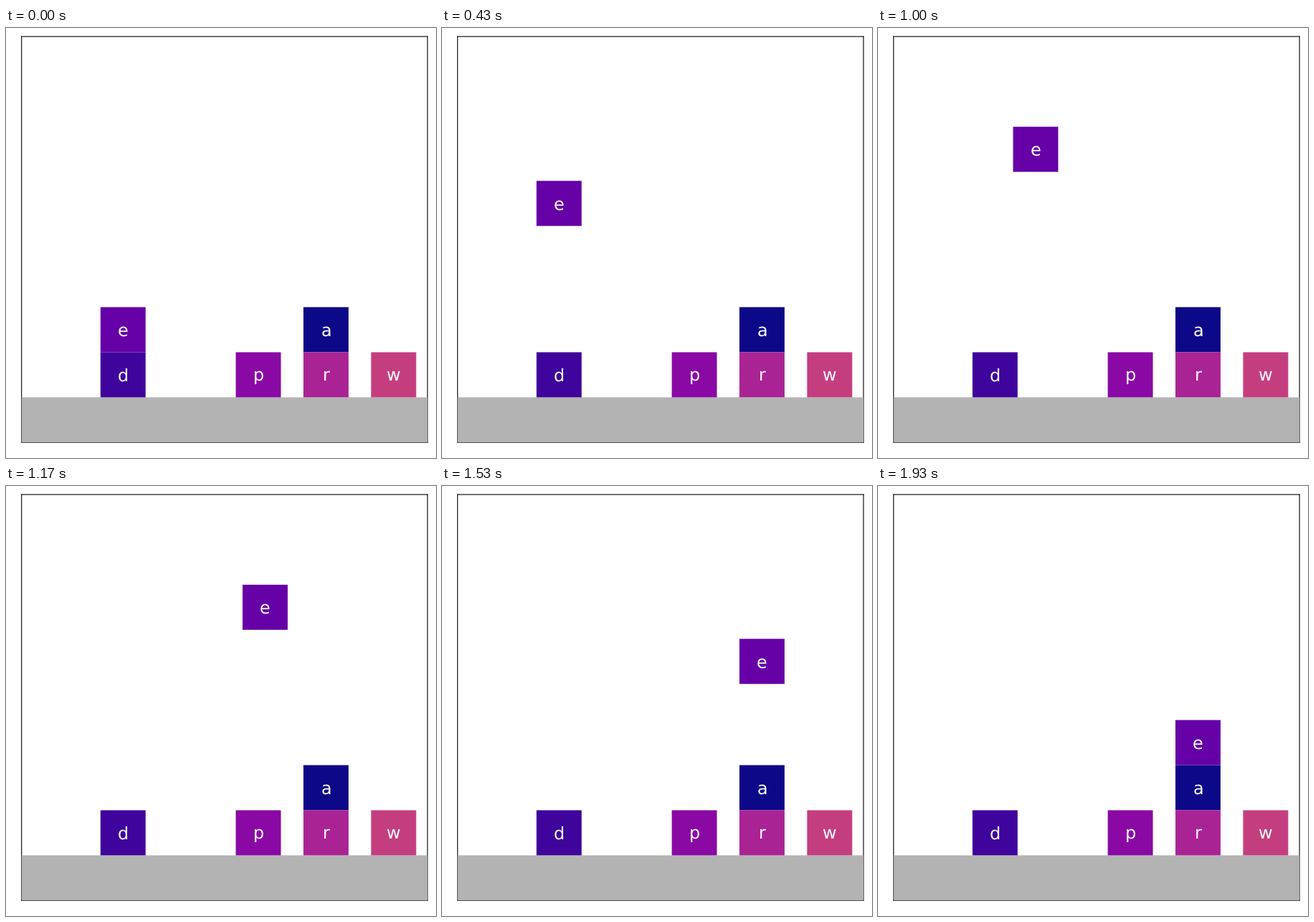
A matplotlib script that plays this animation: 600 by 600 pixels, repeating every 1960 ms.

```python
import matplotlib.pyplot as plt
from matplotlib.animation import FuncAnimation
from matplotlib.patches import Rectangle

plt.rcParams["font.family"] = "DejaVu Sans"
plt.rcParams["text.hinting"] = "none"

SIZE, DPI = 600, 100
LOOP_MS, TICK_MS = 1960, 10
UNITS = 9
LEFT, BOTTOM, SPAN = 21.7, 21.7, 566.4  # plot area in pixels
BASELINE = -8.5 * UNITS / SPAN  # letter baseline below the block centre


def points(pixels):
    return pixels * 72 / DPI


fig = plt.figure(figsize=(SIZE / DPI, SIZE / DPI), dpi=DPI, facecolor="white")
ax = fig.add_axes([LEFT / SIZE, BOTTOM / SIZE, SPAN / SIZE, SPAN / SIZE])
ax.set(xlim=(0, UNITS), ylim=(0, UNITS), xticks=[], yticks=[])
for spine in ax.spines.values():
    spine.set(linewidth=points(1.1), color="black", snap=False, zorder=0.5)


def add_rect(x, y, width, color):
    return ax.add_patch(Rectangle((x, y), width, 1, facecolor=color,
                                  linewidth=0, snap=False, clip_on=False))


class Block:
    def __init__(self, letter, x, y, color):
        self.rect = add_rect(x, y, 1, color)
        self.label = ax.text(0, 0, letter, color="white", ha="center",
                             va="baseline", fontsize=points(24))
        self.move(x, y)

    def move(self, x, y):
        self.rect.set_xy((x, y))
        self.label.set_position((x + 0.5, y + 0.5 + BASELINE))


def column(i):
    return 0.25 + 1.5 * i


add_rect(0, 0, UNITS, "#b3b3b3")
layout = {"a": (4, 2), "d": (1, 1), "e": (1, 2),
          "p": (3, 1), "r": (4, 1), "w": (5, 1)}
blocks = {letter: Block(letter, column(col), row, plt.cm.plasma(24 * i))
          for i, (letter, (col, row)) in enumerate(layout.items())}


def progress(step, before, count):
    return min(max(step - before, 0), count) / count


def update(tick):
    step = (3 * tick + 1) // 10  # 30 steps per second on a 10 ms clock
    # Lift and carry each skip their first step as they start.
    lift = progress(step, -1, 20) if step else 0
    carry = progress(step, 28, 10) if step > 29 else 0
    lower = progress(step, 38, 20)
    x = column(1) + carry * (column(4) - column(1))
    blocks["e"].move(x, 2 + 4 * lift - 3 * lower)
    return blocks["e"].rect, blocks["e"].label


anim = FuncAnimation(fig, update, frames=LOOP_MS // TICK_MS,
                     interval=TICK_MS, repeat=True, repeat_delay=0)
plt.show()
```
